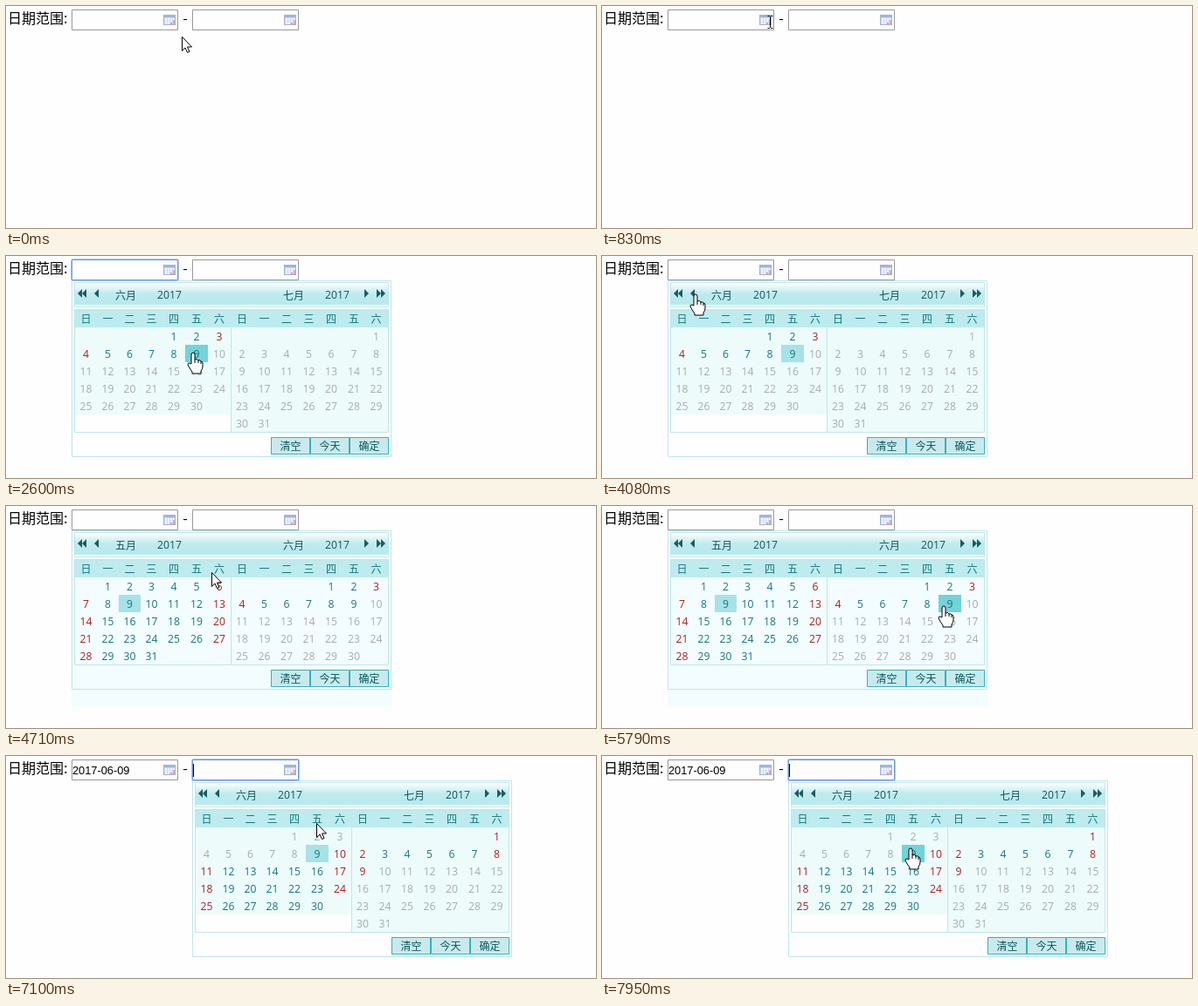
An HTML page with a canvas for the animation above (8 s loop, 675 by 255 pixels).

```html
<!DOCTYPE html>
<html lang="zh-CN">
<head>
<meta charset="utf-8">
<title>日期范围</title>
<style>
html, body { margin: 0; width: 100%; height: 100%; overflow: hidden; background: #fefefe; }
canvas { display: block; }
</style>
</head>
<body>
<canvas id="stage" width="675" height="255"></canvas>
<script>
const ctx = document.getElementById('stage').getContext('2d');
const LOOP = 8000, OPEN = 1100, BLUR = 4080, BACK = 4200, PICK = 6100, REOPEN = 6670;
const STEP = 135, BLINK = 500;
const PAPER = '#fefefe', LINE = '#bfe6ea', TEAL = '#13777e', DARK = '#14545a';
const CJK = '"Noto Sans CJK SC", "Noto Sans CJK", sans-serif';
const SMALL = '12px ' + CJK, LARGE = '16px ' + CJK;
const NUM = '12.2px "Open Sans", sans-serif';
const WEEK = '日一二三四五六';
const NAMES = '一二三四五六七';

// Column edges of the two month tables
const leftEdge = c => 79 + 25 * c + Math.max(0, c - 4);
const rightEdge = c => 257 + Math.round(25.6 * c);

const linear = p => p;
const easeOut = p => 1 - (1 - p) ** 3;
const START = { x: 201, y: 35 };
const MOVES = [
  { from: 590, to: 830, x: 193, y: 19, ease: linear },
  { from: 1500, to: 1900, x: 214, y: 111, ease: easeOut },
  { from: 2850, to: 3810, x: 107, y: 44, ease: easeOut },
  { from: 4460, to: 5790, x: 391, y: 115, ease: easeOut },
  { from: PICK, to: REOPEN, x: 322, y: 11, ease: easeOut },
  { from: 6950, to: 7380, x: 387, y: 143, ease: linear },
  { from: 7520, to: 7950, x: 353, y: 106, ease: easeOut }
];

const ARROW = new Path2D('M.5.5V16.5L4 13L6.5 18.5L9 17.5L6.5 12H11.5Z');
const HAND = new Path2D('M-2 13V2Q-2 0 0 0T2 2V8Q5 6.5 6 9Q8.5 8 9 10Q11 10 11 12V16Q11 19 9 21V24H-1V22Q-4 18 -6 14Q-6 11.5 -4 12Z');
const FINGERS = new Path2D('M2 8V12M6 9V12M9 10V13');
const BEAM = new Path2D('M-3-7.5H-1L0-6.5L1-7.5H3M0-6.5V5.5M-3 6.5H-1L0 5.5L1 6.5H3');

function box(x, y, w, h, fill) {
  ctx.fillStyle = fill;
  ctx.fillRect(x, y, w, h);
}

function frame(x, y, w, h, color, radius = 0) {
  ctx.strokeStyle = color;
  ctx.lineWidth = 1;
  ctx.beginPath();
  ctx.roundRect(x + .5, y + .5, w - 1, h - 1, radius);
  ctx.stroke();
}

function text(str, x, y, color, font, align = 'left') {
  ctx.font = font;
  ctx.fillStyle = color;
  ctx.textAlign = align;
  ctx.fillText(str, x, y);
}

function fade(top, bottom, ...colors) {
  const g = ctx.createLinearGradient(0, top, 0, bottom);
  colors.forEach((color, i) => g.addColorStop(i / (colors.length - 1), color));
  return g;
}

// Pointer place: each move advances in even steps of time
function pointerAt(t) {
  let { x, y } = START;
  for (const m of MOVES) {
    if (t < m.from) break;
    const steps = Math.round((m.to - m.from) / STEP);
    const done = Math.floor((t - m.from) / (m.to - m.from) * steps) + 1;
    const p = m.ease(Math.min(1, done / (steps + 1)));
    x += (m.x - x) * p;
    y += (m.y - y) * p;
  }
  return { x: Math.round(x), y: Math.round(y) };
}

function icon(x, y) {
  box(x, y, 14, 12, '#a3b0d0');
  box(x + 1, y + 1, 12, 10, '#cfdaf0');
  box(x + 1, y + 1, 12, 2, fade(y, y + 3, '#b9cbee', '#8fa9da'));
  for (let r = 0; r < 3; r++) {
    for (let c = 0; c < 4; c++) {
      box(x + 2 + 3 * c, y + 4 + 2.5 * r, 2, 2, r + c > 3 ? '#e9a08c' : '#f3f6fc');
    }
  }
}

function field(x, value, focused, caret) {
  box(x, 4, 122, 24, PAPER);
  if (focused) frame(x - 1, 3, 124, 26, '#a9c5f0', 2);
  frame(x, 4, 122, 24, focused ? '#6a98dd' : '#999');
  text(value, x + 1, 21, '#000', '12.8px "Liberation Sans", sans-serif');
  icon(x + 105, 10);
  if (caret) box(x + 1, 9, 1, 15, '#000');
}

function triangle(x, dir) {
  ctx.fillStyle = '#175d62';
  ctx.beginPath();
  ctx.moveTo(x, 43);
  ctx.lineTo(x + 5 * dir, 38);
  ctx.lineTo(x + 5 * dir, 48);
  ctx.fill();
}

// Draws one month and returns whether the pointer is over a valid day
function monthTable(month, edge, titleX, cal, px, py) {
  const first = new Date(2017, month - 1, 1).getDay();
  const days = new Date(2017, month, 0).getDate();
  const rows = Math.ceil((first + days) / 7);
  text(NAMES[month - 1] + '月', titleX, 50, DARK, SMALL);
  text('2017', titleX + 48, 49, DARK, NUM);
  box(edge(0), 82, 180, rows * 20, cal.tint);
  for (let c = 0; c < 7; c++) {
    text(WEEK[c], (edge(c) + edge(c + 1)) / 2, 77, TEAL, SMALL, 'center');
  }
  let over = false;
  for (let d = 1; d <= days; d++) {
    const n = first + d - 1, c = n % 7, key = month * 100 + d;
    const x = edge(c), w = edge(c + 1) - x, y = 82 + 20 * Math.floor(n / 7);
    const valid = key >= cal.min && key <= cal.max;
    const hot = valid && px >= x && px < x + w && py >= y && py < y + 20;
    over = over || hot;
    if (hot || key === cal.selected) box(x, y, w, 20, hot ? '#74d2d9' : '#a7e2e7');
    const color = !valid ? '#aaa' : c % 6 ? TEAL : '#ab1e1e';
    text(d, x + w / 2, y + 15, color, NUM, 'center');
  }
  return over;
}

function calendar(cal, px, py) {
  const bottom = 82 + cal.rows * 20;
  ctx.save();
  ctx.translate(cal.dx, 0);
  px -= cal.dx;
  box(75, 28, 366, bottom + 1, PAPER);
  // A shorter panel leaves a pale strip under itself
  if (cal.rows === 5) box(75, bottom, 366, 49, cal.tint);
  frame(75, 28, 366, bottom + 1, LINE);

  frame(78, 30, 360, 29, LINE);
  box(79, 31, 358, 25, fade(31, 56, PAPER, '#bdebee', '#b9e9ec'));
  for (const x of [82, 87, 101]) triangle(x, 1);
  for (const x of [415, 429, 434]) triangle(x, -1);

  box(78, 61, 360, 21, '#bdebee');
  const overLeft = monthTable(cal.month, leftEdge, 125, cal, px, py);
  const overRight = monthTable(cal.month + 1, rightEdge, 317, cal, px, py);
  box(257, 82, 1, bottom - 82, LINE);
  frame(78, 61, 360, bottom - 60, LINE);

  ['清空', '今天', '确定'].forEach((label, i) => {
    const x = 303 + 45 * i;
    box(x, bottom + 6, 45, 20, '#c9eaed');
    frame(x, bottom + 6, 45, 20, '#38b1b9');
    text(label, x + 22.5, bottom + 21, '#08575b', SMALL, 'center');
  });
  ctx.restore();
  const overNav = py > 34 && py < 54 && px > 80 && px < 110;
  return overLeft || overRight || overNav;
}

function pointer(x, y, hand) {
  const inField = y >= 4 && y < 28 && (x >= 75 && x < 197 || x >= 213 && x < 335);
  ctx.save();
  ctx.translate(x, y);
  ctx.strokeStyle = '#000';
  ctx.fillStyle = '#fff';
  ctx.lineWidth = 1;
  if (inField) {
    ctx.translate(-.5, 0);
    ctx.stroke(BEAM);
  } else {
    const shape = hand ? HAND : ARROW;
    ctx.fill(shape);
    ctx.stroke(shape);
    if (hand) ctx.stroke(FINGERS);
  }
  ctx.restore();
}

function calendarAt(t) {
  const june = { dx: 0, month: 6, rows: 6, min: 0, max: 609, selected: 609, tint: '#edfbfb' };
  if (t >= REOPEN) return { ...june, dx: 138, min: 609, max: 709 };
  if (t < OPEN || t >= PICK) return null;
  return t < BACK ? june : { ...june, month: 5, rows: 5, selected: 509, tint: '#f3fcfe' };
}

function draw(t) {
  box(0, 0, 675, 255, PAPER);
  text('日期范围:', 2, 20, '#000', LARGE);
  text('-', 205, 20, '#000', LARGE, 'center');

  const { x, y } = pointerAt(t), cal = calendarAt(t);
  const hand = cal ? calendar(cal, x, y) : false;
  const picked = t >= PICK, second = t >= REOPEN;
  const editing = t >= OPEN && t < BLUR;
  if (picked && !second) box(75, 211, 366, 20, '#f3fcfe');

  const blink = since => (t - since) % (2 * BLINK) < BLINK;
  field(75, picked ? '2017-06-09' : '', editing || picked && !second, editing && blink(OPEN));
  field(213, '', second, second && blink(REOPEN));
  pointer(x, y, hand);
}

function tick() {
  draw(performance.now() % LOOP);
  requestAnimationFrame(tick);
}
tick();
</script>
</body>
</html>
```
